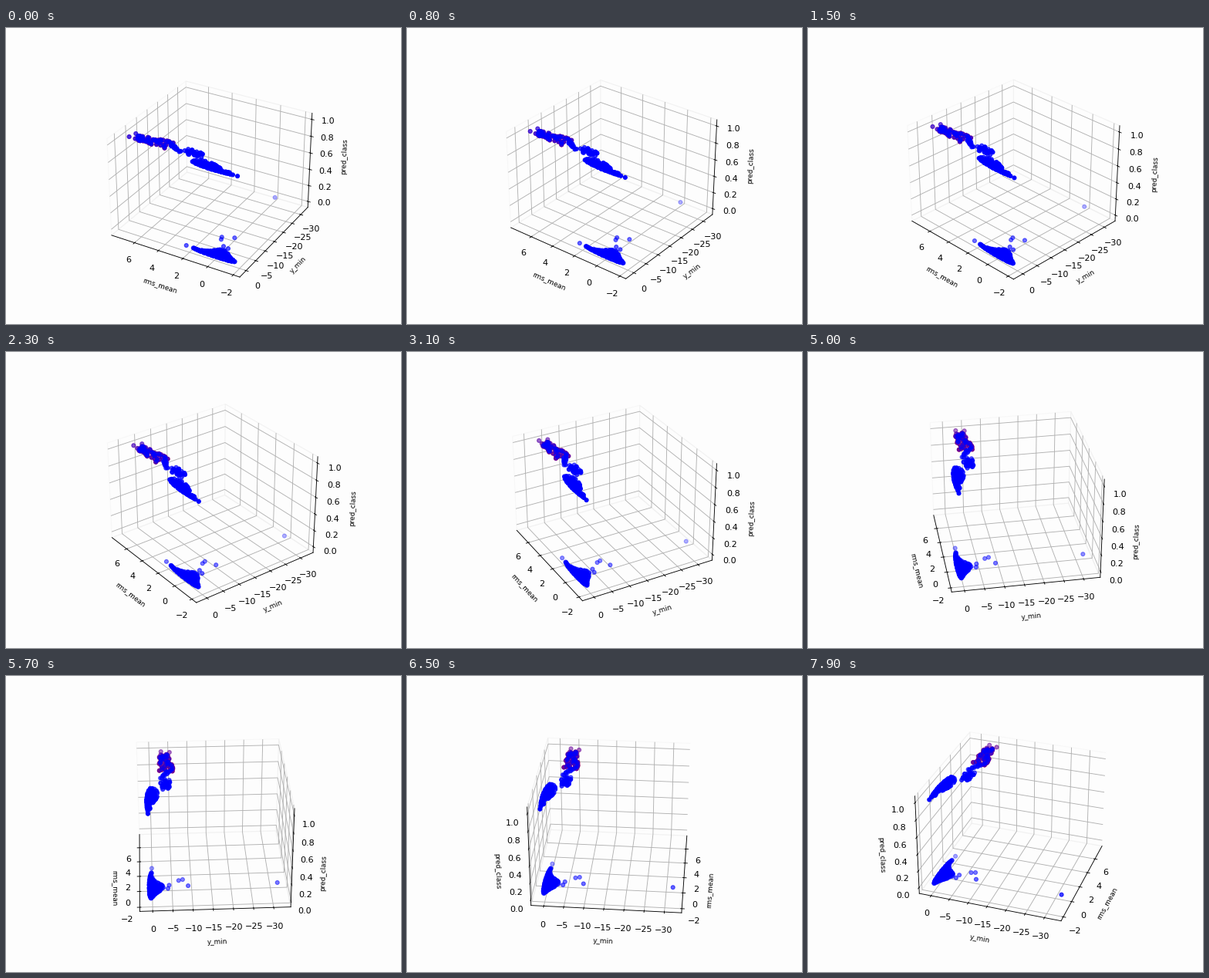
Recreate the animation shown at these times as a matplotlib script. Size 512 by 384 pixels, loop 8000 ms.

```python
import matplotlib.pyplot as plt
import numpy as np
from matplotlib.animation import FuncAnimation

FRAMES, INTERVAL = 80, 100
ELEV, START_AZIM = 30, 120
rng = np.random.default_rng(11)


def strand(n, start, end, w0, w1):
    """Points along a line, spread in y by a half-width going from w0 to w1."""
    t = rng.uniform(0, 1, n)
    x, y = (a + (b - a) * t for a, b in zip(start, end))
    return np.column_stack([x, y + (w0 + (w1 - w0) * t) * rng.uniform(-1, 1, n)])


def wedge(n, left, mode, right, peak, width, depth):
    """Points below a curved upper limit, reaching deepest near the peak."""
    x = rng.triangular(left, mode, right, n)
    top = 0.8 - np.where(x > 0, 0.22, 0.1) * x ** 2
    reach = 0.5 + depth * np.exp(-((x - peak) / width) ** 2)
    return np.column_stack([x, top - reach * np.minimum(rng.exponential(0.4, n), 1)])


head = np.vstack([
    strand(60, (6.9, -3.8), (4.2, -4.3), 1.0, 2.2),
    [(7.33, -3.14), (7.18, -5.35)],
])
upper = np.vstack([
    head,
    strand(16, (4.2, -4.8), (3.1, -2.8), 0.5, 0.4),
    strand(38, (3.0, -4.0), (1.5, -3.9), 1.4, 0.9),
    wedge(150, -1.6, 0.3, 2.15, 0.7, 1.2, 2.1),
    [(-1.83, 0.5)],
])
lower = np.vstack([
    wedge(300, -1.85, -0.6, 1.95, -0.3, 0.75, 3.1),
    [(2.25, 0.02), (-0.06, -4.28), (-0.48, -3.96), (0.52, -6.74),
     (0.63, -7.76), (-0.2, -9.06), (-0.12, -31.7)],
])
points = np.vstack([upper, lower])
classes = np.repeat([1, 0], [len(upper), len(lower)])

fig = plt.figure(figsize=(6.4, 4.8), dpi=80, facecolor="#fdfdfd")
ax = fig.add_subplot(projection="3d", facecolor="#fdfdfd")
ax.scatter(*head.T, 1, c="red")
ax.scatter(*points.T, classes, c="blue")

ax.set(xlim=(-2.51, 7.96), ylim=(-34.25, 3.2), zlim=(-0.073, 1.073))
ax.set_xlabel("rms_mean", fontsize=8)
ax.set_ylabel("y_min", fontsize=8)
ax.set_zlabel("pred_class", fontsize=8)
for axis in (ax.xaxis, ax.yaxis, ax.zaxis):
    axis.pane.fill = False


def update(i):
    ax.view_init(ELEV, START_AZIM + i)


anim = FuncAnimation(fig, update, frames=FRAMES, interval=INTERVAL,
                     init_func=lambda: None, repeat=True, repeat_delay=0)
plt.show()
```
